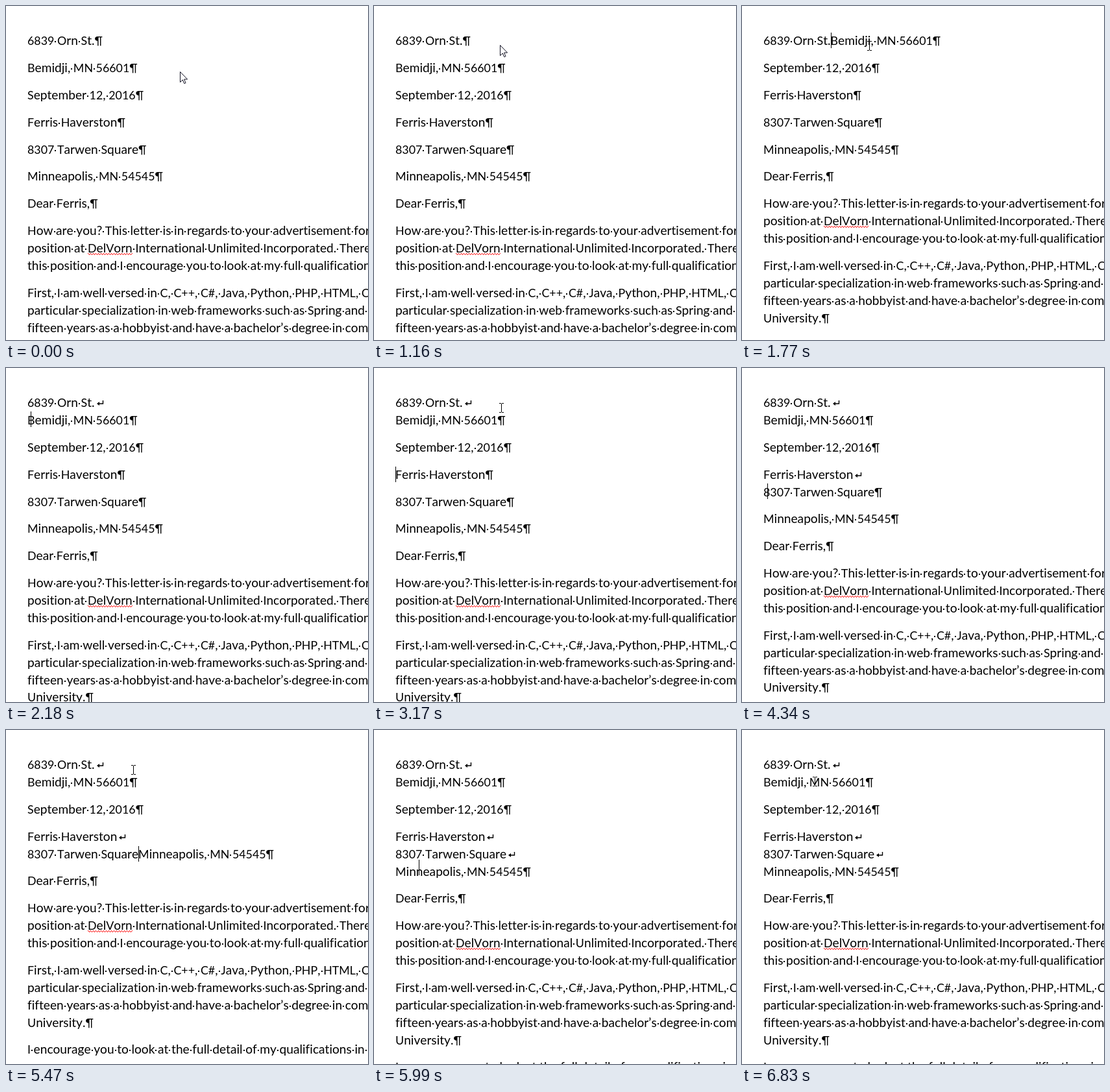
Write an HTML page that moves like this. It is 558x515 px and loops after 6920 ms.

```html
<!DOCTYPE html>
<html lang="en">
<head>
<meta charset="utf-8">
<title>Line breaks in a letter</title>
<style>
  html, body { margin: 0; width: 100%; height: 100%; overflow: hidden; background: #fff; }
  #stage { position: relative; width: 558px; height: 515px; overflow: hidden; color: #000;
    font: 19.15px/27px Lato, Carlito, sans-serif; font-kerning: none; font-variant-ligatures: none; }
  .row { position: absolute; left: 33px; height: 27px; white-space: pre; }
  /* capitals and digits are set a little smaller */
  b { font-weight: 400; font-size: 17.83px; line-height: 0; }
  /* spaces with a visible dot */
  i { display: inline-block; width: 4.6px; height: 27px; vertical-align: top;
    background: linear-gradient(#000, #000) 1px 15px / 2px 2px no-repeat; }
  u { text-decoration: none; background:
    linear-gradient(90deg, red 25%, #0000 0) 0 20px / 4px 1px repeat-x,
    linear-gradient(90deg, red 50%, #0000 0) 1px 21px / 2px 1px repeat-x,
    linear-gradient(90deg, red 25%, #0000 0) 2px 22px / 4px 1px repeat-x; }
  .turn { margin-left: 2px; }
  #caret, .pointer { position: absolute; left: 0; top: 0; }
  #caret { width: 1px; height: 24px; background: #000; }
</style>
</head>
<body>
<div id="stage">
  <div id="page"></div>
  <div id="caret"></div>
  <svg id="arrow" class="pointer" width="13" height="20">
    <path d="M.5 .5V16.5L4.3 12.9L6.8 18.6L9 17.6L6.6 12H11.6Z" fill="#fff" stroke="#112" stroke-linejoin="round"/>
  </svg>
  <svg id="beam" class="pointer" width="7" height="15" shape-rendering="crispEdges">
    <path d="M0 .5H3M4 .5H7M3.5 1V14M0 14.5H3M4 14.5H7" fill="none" stroke="#000"/>
  </svg>
</div>
<script>
const LOOP = 6920, LEFT = 33, TOP = 54.1, LINE = 26.9, PARA = 41.85;
const $ = id => document.getElementById(id);
const page = $('page');

// text, end mark: ¶ paragraph, ↵ line break, ~ soft wrap, '' joined to the next
const letter = [
  ['6839 Orn St.', '¶'],
  ['Bemidji, MN 56601', '¶'],
  ['September 12, 2016', '¶'],
  ['Ferris Haverston', '¶'],
  ['8307 Tarwen Square', '¶'],
  ['Minneapolis, MN 54545', '¶'],
  ['Dear Ferris,', '¶'],
  ['How are you? This letter is in regards to your advertisement for the', '~'],
  ['position at <u>DelVorn</u> International Unlimited Incorporated. There', '~'],
  ['this position and I encourage you to look at my full qualifications', '~'],
  ['First, I am well versed in C, C++, C#, Java, Python, PHP, HTML, CSS,', '~'],
  ['particular specialization in web frameworks such as Spring and ', '~'],
  ['fifteen years as a hobbyist and have a bachelor’s degree in computer', '~'],
  ['University.', '¶'],
  ['I encourage you to look at the full detail of my qualifications in ', '~']
];
letter[9][1] = '¶ ';   // paragraph end beyond the right edge

// time, end marks of lines 0, 3 and 4
const edits = [
  [0, '¶', '¶', '¶'],
  [1610, '', '¶', '¶'],
  [2100, '↵', '¶', '¶'],
  [3930, '↵', '', '¶'],
  [4270, '↵', '↵', '¶'],
  [5470, '↵', '↵', ''],
  [5990, '↵', '↵', '↵']
];

const turn = '<svg class="turn" width="12" height="13"><path d="M10.5 3V8H4" fill="none" stroke="#000" stroke-width="1.4"/><path d="M1 8L5 5V11Z"/></svg>';
const markup = s => s.replace(/[A-Z0-9#+]+|¶| /g, m => m === ' ' ? '<i> </i>' : `<b>${m}</b>`);

function layout([, a, b, c]) {
  const marks = { 0: a, 3: b, 4: c };
  let y = TOP, html = '', row = '';
  letter.forEach(([text, end], n) => {
    const mark = marks[n] ?? end;
    row += `<span>${markup(text)}</span>`;
    if (!mark) return;
    row += mark === '↵' ? turn : mark === '¶' ? markup(mark) : '';
    html += `<div class="row" style="top:${Math.round(y) - 15}px">${row}</div>`;
    y += mark[0] === '¶' ? PARA : LINE;
    row = '';
  });
  page.innerHTML = html;
}

layout(edits[0]);
const ends = [...page.querySelectorAll('.row > span')]
  .map(s => Math.round(LEFT + s.offsetLeft + s.offsetWidth));

// time, x, top; the caret glides from the entry before unless that one was hidden
const carets = [
  [0, null],
  [520, ends[0], 41],
  [1070, null],
  [1610, ends[0], 41],
  [2100, LEFT, 68],
  [2640, LEFT, 110],
  [2940, LEFT, 152],
  [3650, ends[3], 152],
  [4270, LEFT, 179],
  [4870, null],
  [5090, LEFT, 179],
  [5091, ends[4], 179],
  [5990, LEFT, 205],
  [6470, null]
];

// time, shape, x, y
const pointers = [
  [0, 'arrow', 268, 101],
  [70, 'arrow', 222, 66],
  [150, 'arrow', 198, 36],
  [290, 'arrow', 196, 52],
  [370, 'arrow', 194, 60],
  [1610, 'beam', 193, 54],
  [2100, ''],
  [2640, 'beam', 193, 54],
  [4270, ''],
  [4490, 'beam', 193, 54],
  [5850, ''],
  [6090, 'beam', 193, 54],
  [6830, 'beam', 109, 72]
];

const at = (table, t) => table.findLastIndex(e => e[0] <= t);
const place = (el, x, y) => { el.style.transform = `translate(${x}px,${y}px)`; };
const show = (el, on) => { el.style.visibility = on ? 'visible' : 'hidden'; };

function drawCaret(t) {
  const n = at(carets, t), [start, x, y] = carets[n];
  show($('caret'), x !== null);
  if (x === null) return;
  const from = carets[n - 1][1] === null ? carets[n] : carets[n - 1];
  const step = Math.floor((t - start) / 70) + 1;
  const k = step > 3 ? 0 : 0.21 ** step;
  place($('caret'), Math.round(x + (from[1] - x) * k), Math.round(y + (from[2] - y) * k));
}

function drawPointer(t) {
  const [, shape, x, y] = pointers[at(pointers, t)];
  for (const id of ['arrow', 'beam']) show($(id), id === shape);
  if (shape) place($(shape), x, y);
}

let current = 0;
const begin = performance.now();
function frame() {
  const t = (performance.now() - begin) % LOOP;
  const n = at(edits, t);
  if (n !== current) layout(edits[current = n]);
  drawCaret(t);
  drawPointer(t);
  requestAnimationFrame(frame);
}
frame();
</script>
</body>
</html>
```
